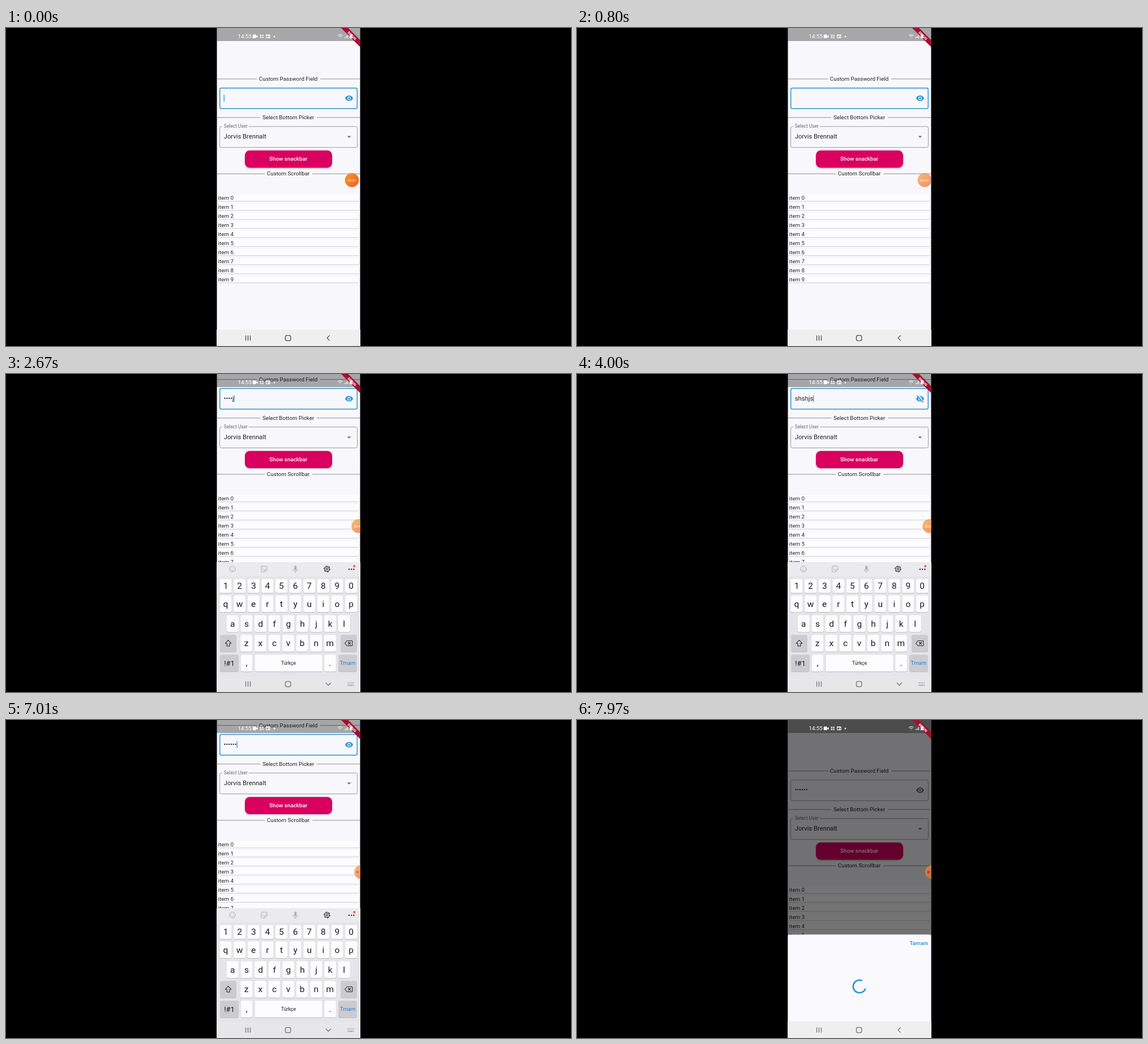
An HTML page for the animation above (8000 ms loop, 998x561 px).

```html
<!DOCTYPE html>
<html lang="en">
<head>
<meta charset="utf-8">
<title>Custom widgets demo</title>
<style>
html, body { margin: 0; width: 100%; height: 100%; overflow: hidden; background: #000; }
svg { display: block; width: 100vw; height: 100vh; }
text { font-family: Roboto, "Noto Sans", sans-serif; font-size: 9.84px; fill: #222; white-space: pre; }
.mid { text-anchor: middle; }
.bold { font-weight: 500; }
.big { font-size: 11.25px; }
.small { font-size: 8.4px; fill: #6d6c70; }
.key { font-size: 15.5px; fill: #1c1c1e; }
.line { fill: none; stroke-linecap: round; stroke-linejoin: round; }

.anim { animation: 8s linear infinite; }
.step { animation: 8s step-end infinite; }
#page { animation-name: scroll; }
#keys { animation-name: keys; }
#void { animation-name: void; }
#nav { animation-name: navTone; }
.navOpen { animation-name: navOpen; }
.navBack { animation-name: navBack; }
#focus { animation-name: focus; }
#idle { animation-name: idle; }
#eye { animation-name: eye; }
#arrow { animation-name: arrow; }
#ripple { animation-name: ripple; transform-origin: 606px 124px; }
#dim { animation-name: dim; }
#sheet { animation-name: sheet; }
#spin { animation-name: spin; }
#bubble { animation-name: bubble; }
#clock { animation-name: clock; }
#dot { animation-name: dot; }

@keyframes scroll {
  0%, 12.1% { transform: translateY(0); }
  13.4%, 96.74% { transform: translateY(-80.3px); }
  96.75%, 100% { transform: translateY(0); }
}
@keyframes keys {
  0%, 10.8% { transform: translateY(200px); animation-timing-function: ease-out; }
  12.8%, 92.99% { transform: translateY(0); }
  93%, 100% { transform: translateY(200px); }
}
@keyframes void { 0% { visibility: hidden; } 12.1% { visibility: visible; } 96.75%, 100% { visibility: hidden; } }
@keyframes navTone { 0% { color: #4c4c4e; } 10.87%, 100% { color: #727274; } }
@keyframes navOpen { 0% { visibility: hidden; } 10.87% { visibility: visible; } 93%, 100% { visibility: hidden; } }
@keyframes navBack { 0% { visibility: visible; } 10.87% { visibility: hidden; } 93%, 100% { visibility: visible; } }
@keyframes focus { 0% { visibility: visible; } 96.75%, 100% { visibility: hidden; } }
@keyframes idle { 0% { visibility: hidden; } 96.75%, 100% { visibility: visible; } }
@keyframes eye { 0% { color: #2395dc; } 95.12%, 100% { color: #77767a; } }
@keyframes arrow { 0% { fill: #77767a; } 95.12% { fill: #2395dc; } 96.75%, 100% { fill: #77767a; } }
@keyframes ripple {
  0%, 43.6% { opacity: 0; transform: scale(.4); }
  44.6% { opacity: .1; transform: scale(.8); }
  45.6% { opacity: .1; transform: scale(1); }
  47.1% { opacity: 0; transform: scale(1); }
  47.2%, 59.2% { opacity: 0; transform: scale(.4); }
  60.2% { opacity: .1; transform: scale(.8); }
  61.2% { opacity: .1; transform: scale(1); }
  62.9%, 100% { opacity: 0; transform: scale(1); }
}
@keyframes dim { 0%, 96.6% { opacity: 0; } 99.5%, 100% { opacity: .54; } }
@keyframes sheet {
  0%, 96.7% { transform: translateY(156px); animation-timing-function: cubic-bezier(.2, .6, .3, 1); }
  99.6%, 100% { transform: translateY(0); }
}
@keyframes spin { 0%, 96.7% { stroke-dasharray: 60 300; } 99.6%, 100% { stroke-dasharray: 275 85; } }
@keyframes bubble {
  0%, .4% { transform: translateX(611px); opacity: 1; }
  6.5%, 10.9% { transform: translateX(614px); opacity: .66; }
  13.4%, 55.8% { transform: translateX(622.5px); opacity: .66; }
  56.25%, 100% { transform: translateX(627.3px); opacity: .66; }
}
@keyframes clock { 0% { visibility: visible; } 55.87%, 100% { visibility: hidden; } }
@keyframes dot { 0% { visibility: hidden; } 55.87%, 100% { visibility: visible; } }
</style>
</head>
<body>
<svg viewBox="0 0 998 561" preserveAspectRatio="none">
  <defs>
    <clipPath id="phone"><rect x="372.5" width="253" height="561"/></clipPath>
    <linearGradient id="orange" x2="1" y2="1"><stop offset="0" stop-color="#f79a2c"/><stop offset="1" stop-color="#ee5a24"/></linearGradient>
    <filter id="soft" x="-20%" y="-40%" width="140%" height="200%"><feDropShadow dx="0" dy="1.2" stdDeviation="1" flood-opacity=".3"/></filter>
  </defs>
  <rect width="998" height="561"/>
  <g clip-path="url(#phone)">
    <rect x="372" width="254" height="561" fill="#f8f7fb"/>

    <g id="page" class="anim">
      <g id="titles"></g>
      <rect id="focus" class="step" x="377.7" y="105.9" width="242.6" height="36.3" rx="2.6" fill="none" stroke="#2d94d2" stroke-width="1.5"/>
      <rect id="idle" class="step" x="377.5" y="105.7" width="243" height="36.7" rx="2.8" fill="none" stroke="#858489" stroke-width=".8"/>
      <text id="pass" class="big" x="384.7" y="127.4"></text>
      <rect id="caret" y="117.8" width="1.3" height="12" fill="#2d94d2"/>
      <circle id="ripple" class="anim" cx="606" cy="124" r="21"/>
      <g id="eye" class="step" fill="currentColor" transform="translate(598.3 116.3) scale(.64)">
        <path d="M12 4.5C7 4.5 2.73 7.61 1 12c1.73 4.39 6 7.5 11 7.5s9.27-3.11 11-7.5c-1.73-4.39-6-7.5-11-7.5zM12 17c-2.76 0-5-2.24-5-5s2.24-5 5-5 5 2.24 5 5-2.24 5-5 5zm0-8c-1.66 0-3 1.34-3 3s1.34 3 3 3 3-1.34 3-3-1.34-3-3-3z"/>
        <g id="slash" class="line" stroke-width="2"><path d="M4 1.5 22 19.5" stroke="#f8f7fb"/><path d="M3 3.5 21 21.5" stroke="currentColor"/></g>
      </g>

      <path d="M382 173.8H380.3A2.8 2.8 0 0 0 377.5 176.6V207.9A2.8 2.8 0 0 0 380.3 210.7H617.7A2.8 2.8 0 0 0 620.5 207.9V176.6A2.8 2.8 0 0 0 617.7 173.8H428.5" fill="none" stroke="#858489" stroke-width=".8"/>
      <text class="small" x="384.7" y="176.3">Select User</text>
      <text class="big" x="384.7" y="195.3">Jorvis Brennalt</text>
      <path id="arrow" class="step" d="M602.4 190.5h7.2l-3.6 3.6z"/>

      <rect x="422" y="216" width="154" height="30.4" rx="8.4" fill="#d9005f" filter="url(#soft)"/>
      <text class="mid bold" x="498.7" y="234.4" style="fill:#fff">Show snackbar</text>
      <g id="items"></g>
    </g>

    <rect id="void" class="step" x="372" y="332" width="254" height="201" fill="#f8f7fb"/>
    <rect x="372" width="254" height="23" fill-opacity=".33"/>
    <rect id="dim" class="anim" x="372" width="254" height="533"/>

    <g id="sheet" class="anim">
      <path d="M372.5 533V381q0-2.5 2.5-2.5h248q2.5 0 2.5 2.5v152z" fill="#faf9fd"/>
      <text class="bold" x="620.3" y="396.6" text-anchor="end" style="fill:#2395d8">Tamam</text>
      <circle id="spin" class="anim" cx="499" cy="470" r="11.2" pathLength="360" transform="rotate(20 499 470)" fill="none" stroke="#2b94da" stroke-width="2.6"/>
    </g>

    <g id="keys" class="anim">
      <rect x="372" y="332" width="254" height="201" fill="#e5e4e9"/>
      <rect x="372" y="332" width="254" height="25.5" fill="#ebeaee"/>
      <g class="line" stroke="#b3b2b6" stroke-width="1">
        <circle cx="400" cy="344" r="5.2"/><path d="M397.2 345.5q2.8 3.4 5.6 0M398.2 342.2v.3M401.8 342.2v.3"/>
        <path d="M452 339h8q1.2 0 1.2 1.2v5l-4 4H452q-1.2 0-1.2-1.2v-7.8q0-1.2 1.2-1.2zM461 345h-2.500q-1.500 0-1.500 1.500v2.500M453.500 342.200v.3M458 342.200v.3M453.200 345q1.300 1.600 3 .8"/>
        <path d="M507.200 344.200q0 4 4 4t4-4M511.200 348.200v2.300"/>
        <rect x="509.500" y="338.500" width="3.400" height="7.400" rx="1.700" fill="#b3b2b6"/>
      </g>
      <g class="line" stroke="#3c3c3e" stroke-width="1.200">
        <circle cx="567" cy="344" r="1.800"/><circle cx="567" cy="344" r="4.300"/>
        <circle cx="567" cy="344" r="5.200" stroke-dasharray="1.800 3.645"/>
      </g>
      <g fill="#333"><circle cx="606" cy="344.500" r="1.200"/><circle cx="610.200" cy="344.500" r="1.200"/><circle cx="614.400" cy="344.500" r="1.200"/></g>
      <circle cx="615.200" cy="339" r="2" fill="#ee5a24"/>
      <g id="caps"></g>
      <g class="line" stroke="#2a2a2c" stroke-width="1.100">
        <path d="M392.500 469.500l5.200 5.700h-2.800v4.800h-4.800v-4.800h-2.800z"/>
        <path d="M602.500 470.500h8.200q1 0 1 1v7q0 1-1 1h-8.200l-4-4.500zM604.500 473l4 4M608.500 473l-4 4"/>
      </g>
    </g>

    <g id="nav" class="step">
      <rect x="372" y="532" width="254" height="29" fill="#f0eff0"/>
      <rect class="step navOpen" x="372" y="532" width="254" height="29" fill="#e7e6e9"/>
      <g class="line" stroke="currentColor" stroke-width="1.300">
        <path d="M423.500 543v8M427.500 543v8M431.500 543v8"/>
        <rect x="493.500" y="542.300" width="9.300" height="9.300" rx="2.600"/>
        <path class="step navBack" d="M571.300 542.700l-4.300 4.200 4.300 4.200"/>
        <path class="step navOpen" d="M565 544.900l4.300 4.300 4.300-4.300"/>
        <g class="step navOpen" stroke-width=".9" stroke-linecap="butt"><path d="M603.500 544.500h11M603.500 547h11" stroke-dasharray="1.200 1.200"/><path d="M603.500 549.500h2M606.500 549.500h5M612.500 549.500h2"/></g>
      </g>
    </g>

    <path d="M592 0h12.300L626 21.700V34z" fill="#a30f2d"/>
    <text class="mid" transform="translate(609.600 15.200) rotate(45)" style="font-size:5.900px;font-weight:800;fill:#fff">DEBUG</text>

    <text x="409.500" y="18.200" style="fill:#fff;font-size:9.700px">14:55</text>
    <g fill="#fff">
      <rect x="435.700" y="11.600" width="6" height="6.500" rx="1.300"/><path d="M442 14.200l2.500-1.800v5l-2.500-1.800z"/>
      <path d="M448.500 11.800h2.600v2.600h-2.600zM452.200 11.800h2.600v2.600h-2.600zM448.500 15.400h2.600V18h-2.600zM452.200 15.400h2.600V18h-2.600z" opacity=".8"/>
      <path fill-rule="evenodd" d="M459.200 11.600h7.400v6.500h-7.400zM460.200 13.500v3.600h5.400v-3.600z"/>
      <path d="M462.500 14.800h2.400v1.800h-2.400z"/>
      <circle cx="474" cy="15" r="1.500"/>
      <path d="M597.500 16.500h1.200V18h-1.200zM599.400 15h1.200v3h-1.200zM601.300 13.500h1.200V18h-1.200zM603.200 11.800h1.200V18h-1.200z" opacity=".75"/>
      <path d="M607 12h1.200v-.9h2.200v.9h1.200v6.200H607z" opacity=".85"/>
    </g>
    <path class="line" d="M586.500 13q3.700-2.800 7.400 0M588 15q2.200-1.600 4.400 0M590.200 17.200v.3" stroke="#fff" stroke-opacity=".8" stroke-width="1.100"/>

    <g id="bubble" class="anim">
      <circle cy="268.300" r="12.300" fill="url(#orange)"/>
      <text id="clock" class="mid step" y="270.700" style="fill:#fff;font-size:6.200px"></text>
      <circle id="dot" class="step" cx="-6.300" cy="268.300" r="2.300" fill="#e01822"/>
    </g>
  </g>
</svg>
<script>
const $ = id => document.getElementById(id);
const add = (id, html) => $(id).insertAdjacentHTML('beforeend', html);

function title(label, y, left, right) {
  add('titles', `<path d="M372.5 ${y}H${left}M${right} ${y}H625.5" stroke="#77767b" stroke-width=".8"/>
    <text class="mid" x="498.600" y="${y + 3.2}">${label}</text>`);
}
title('Custom Password Field', 89.9, 443.5, 555);
title('Select Bottom Picker', 157.9, 449, 549);
title('Custom Scrollbar', 257.2, 457, 541);

for (let i = 0; i < 10; i++) {
  const y = 294 + i * 16;
  add('items', `<rect x="374" y="${y + .8}" width="249.500" height="11.200" rx="2.500" fill="#c3c2c7"/>
    <rect x="374" y="${y}" width="249.500" height="11.200" rx="2.500" fill="#fdfdff"/>
    <text x="374.600" y="${y + 8.9}">item ${i}</text>`);
}

function cap(x, y, w, h, label = '', fill = '#fdfdff', style = '') {
  const box = (dy, c) => `<rect x="${x - w / 2}" y="${y - h / 2 + dy}" width="${w}" height="${h}" rx="3.200" fill="${c}"/>`;
  add('caps', box(.9, '#bdbcc2') + box(0, fill) +
    `<text class="key mid" x="${x}" y="${y + 5.4}" style="${style}">${label}</text>`);
}
const row = (chars, x, y, h) => [...chars].forEach((c, i) => cap(x + i * 24.62, y, 21, h, c));
const grey = '#cccbd0';
row('1234567890', 388, 374, 24.5);
row('qwertyuiop', 388, 405.3, 29.5);
row('asdfghjkl', 400.3, 440.2, 29.5);
row('zxcvbnm', 424.7, 475, 29.5);
cap(392.5, 475, 29, 29.5, '', grey);
cap(605.5, 475, 29, 29.5, '', grey);
cap(394.5, 510, 33, 29.5, '!#1', grey, 'font-size:13px');
cap(425, 510, 20.5, 29.5, ',');
cap(499, 510, 119, 29.5, '<tspan dy="-2.200">Türkçe</tspan>', '#fdfdff', 'font-size:8.800px');
cap(572.5, 510, 20.5, 29.5, '.');
cap(603.5, 510, 33, 29.5, '<tspan dy="-2">Tmam</tspan>', grey, 'font-size:9.700px;fill:#2583d8');

const word = 'shshjs';
const strokes = [2030, 2170, 2300, 2470, 2600, 2740];
const blinks = [[500, 870], [1370, 1900], [3270, 3770], [4270, 4740], [5270, 5740], [6240, 6740], [7240, 8000]];
const within = (t, a, b) => t >= a && t < b;

function typed(t, shown) {
  const n = strokes.filter(s => t >= s).length;
  if (shown || !n) return word.slice(0, n);
  return t < 3000 ? '•'.repeat(n - 1) + word[n - 1] : '•'.repeat(n);
}

let start;
function draw(now) {
  start ??= now;
  const t = (now - start) % 8000;
  const shown = within(t, 3570, 4800);
  const value = typed(t, shown);
  if ($('pass').textContent !== value) $('pass').textContent = value;
  $('caret').setAttribute('x', 384.6 + (value ? $('pass').getComputedTextLength() : 0));
  $('caret').style.opacity = blinks.some(([a, b]) => within(t, a, b)) ? 0 : 1;
  $('slash').style.visibility = shown ? 'visible' : 'hidden';
  $('clock').textContent = '00:0' + Math.floor((t + 1600) / 1000);
  requestAnimationFrame(draw);
}
requestAnimationFrame(draw);
</script>
</body>
</html>
```
